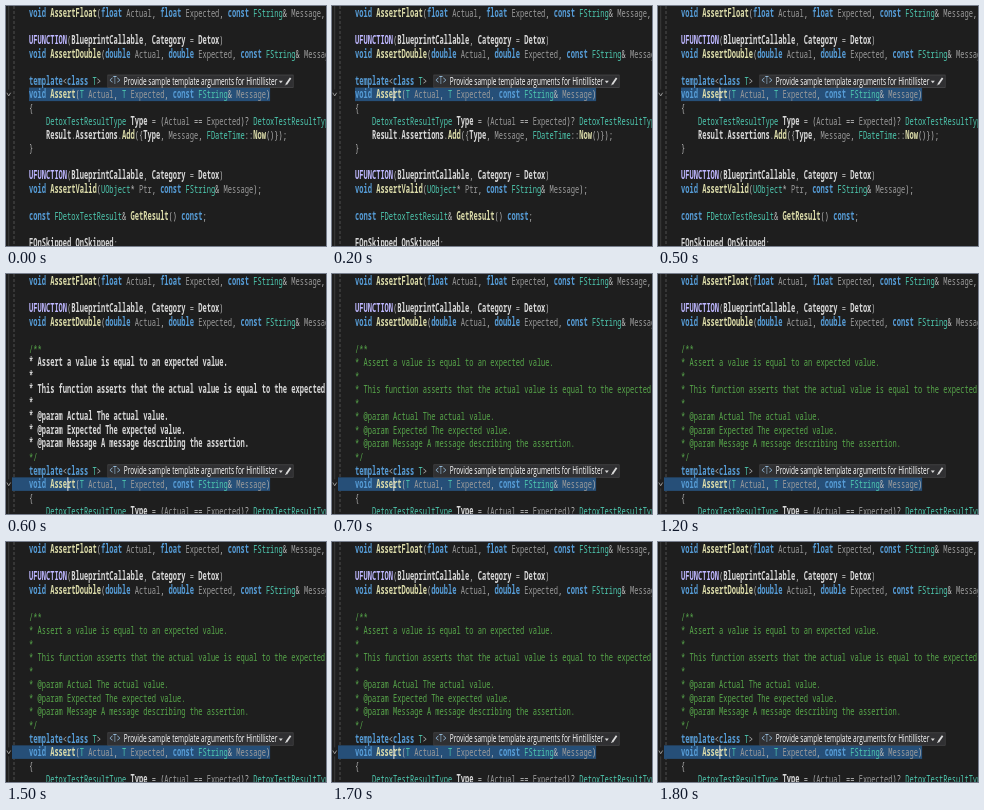
These frames come from a looping animation (320x240 px, 2.1 s). An HTML page with a canvas:

```html
<!DOCTYPE html>
<html lang="en">
<head>
<meta charset="utf-8">
<style>
  html, body { margin: 0; width: 100%; height: 100%; overflow: hidden; background: #1e1e1e; }
  canvas { display: block; }
</style>
</head>
<body>
<canvas id="stage" width="320" height="240"></canvas>
<script>
const ctx = document.getElementById('stage').getContext('2d');

const LOOP = 2100, INSERT_AT = 600, COMMENT_COLORED_AT = 700;
const LEFT = 23, PITCH = 13.53, CELL = 4.23;
// The editor view is squeezed horizontally as a whole.
const SCALE_X = CELL / 12, SCALE_Y = 0.575;
const CODE_FONT = '500 20px "Noto Sans Mono", monospace';
const STRONG_FONT = '600 20px "Noto Sans Mono", monospace';
const LABEL_FONT = '18.5px "Open Sans", sans-serif';
const COLORS = {
  keyword: '#569cd6', type: '#4ec9b0', param: '#9a9a9a', macro: '#beb7ff',
  method: '#dcdcaa', word: '#d8d8d8', sign: '#b8b8b8', comment: '#57a64a'
};

const head = `void AssertFloat(float Actual, float Expected, const FString& Message,

UFUNCTION(BlueprintCallable, Category = Detox)
void AssertDouble(double Actual, double Expected, const FString& Message,
`.split('\n');

const comment = `/**
* Assert a value is equal to an expected value.
*
* This function asserts that the actual value is equal to the expected value.
*
* @param Actual The actual value.
* @param Expected The expected value.
* @param Message A message describing the assertion.
*/`.split('\n');

const tail = `template<class T>
void Assert(T Actual, T Expected, const FString& Message)
{
    DetoxTestResultType Type = (Actual == Expected)? DetoxTestResultType::Pass
    Result.Assertions.Add({Type, Message, FDateTime::Now()});
}

UFUNCTION(BlueprintCallable, Category = Detox)
void AssertValid(UObject* Ptr, const FString& Message);

const FDetoxTestResult& GetResult() const;

FOnSkipped OnSkipped;`.split('\n');

const rowTop = row => 0.4 + row * PITCH;

function text(string, x, baseline, color, font) {
  ctx.save();
  ctx.translate(x, baseline);
  ctx.scale(SCALE_X, SCALE_Y);
  ctx.font = font;
  ctx.fillStyle = color;
  ctx.fillText(string, 0, 0);
  ctx.restore();
}

function rect(x, y, w, h, color) {
  ctx.fillStyle = color;
  ctx.fillRect(x, y, w, h);
}

function path(points, color, width = 1) {
  ctx.beginPath();
  points.forEach(([x, y]) => ctx.lineTo(x, y));
  ctx.strokeStyle = color;
  ctx.lineWidth = width;
  ctx.stroke();
}

function tokenKind(token) {
  if (/^(void|float|double|const|template|class)$/.test(token)) return 'keyword';
  if (/^(T|FString|UObject|FDateTime|FDetoxTestResult|DetoxTestResultType)$/.test(token)) return 'type';
  if (/^(Actual|Expected|Message|Ptr)$/.test(token)) return 'param';
  if (token === 'UFUNCTION') return 'macro';
  if (/^(Assert(Float|Double|Valid)?|GetResult|Add|Now)$/.test(token)) return 'method';
  return /\w/.test(token) ? 'word' : 'sign';
}

function codeLine(line, row, commentColored) {
  const isComment = /^(\/\*|\*)/.test(line);
  const commentKind = commentColored || line.includes('/') ? 'comment' : 'word';
  const tokens = line.matchAll(isComment ? /\S+/g : /\w+|[^\w\s]+/g);
  for (const { 0: token, index } of tokens) {
    const kind = isComment ? commentKind : tokenKind(token);
    const strong = /macro|method|word/.test(kind);
    text(token, LEFT + index * CELL, rowTop(row) + 10.7, COLORS[kind], strong ? STRONG_FONT : CODE_FONT);
  }
}

function tooltip(row) {
  const y = rowTop(row) + 0.6;
  rect(101.5, y, 186, 13.2, '#4a4a4c');
  rect(102.1, y + 0.7, 184.8, 11.8, '#303032');
  text('<T>', 103.2, y + 9.8, '#9cc4e4', '18px "Noto Sans Mono", monospace');
  text('Provide sample template arguments for Hintillister', 117.8, y + 9.9, '#ffffff', LABEL_FONT);
  ctx.fillStyle = '#d8d8d8';
  ctx.beginPath();
  ctx.moveTo(272.8, y + 6);
  ctx.lineTo(276.8, y + 6);
  ctx.lineTo(274.8, y + 8.6);
  ctx.fill();
  path([[280.3, y + 9.6], [284.6, y + 3.4]], '#dcdcdc', 1.8);
  path([[279.4, y + 10.6], [280.5, y + 9.2]], '#dcdcdc', 0.9);
}

function gutter(chevronTop) {
  path([[2.7, 0], [2.7, chevronTop + 2]], '#444444', 0.8);
  path([[2.7, chevronTop + 11], [2.7, 240]], '#444444', 0.8);
  path([[0.8, chevronTop + 5.2], [2.7, chevronTop + 8.4], [4.6, chevronTop + 5.2]], '#a0a0a0', 0.9);
  ctx.setLineDash([3, 2]);
  path([[8, 0], [8, 240]], '#555555', 0.9);
  ctx.setLineDash([]);
}

function draw(time) {
  const inserted = time >= INSERT_AT;
  const caretOn = (time >= 200 && time < 1200) || time >= 1700;
  const lines = [...head, ...(inserted ? comment : []), ...tail];
  const templateRow = lines.indexOf(tail[0]);
  const selectedTop = rowTop(templateRow + 1);
  const selectionLeft = inserted ? 6 : LEFT;
  const selectionRight = LEFT + tail[1].length * CELL;

  rect(0, 0, 320, 240, '#1e1e1e');
  gutter(selectedTop);
  rect(selectionLeft, selectedTop, selectionRight - selectionLeft, PITCH, '#264f78');
  lines.slice(0, 18).forEach((line, row) => codeLine(line, row, time >= COMMENT_COLORED_AT));
  tooltip(templateRow);
  if (caretOn) rect(LEFT + 9 * CELL + 0.3, selectedTop, 1, PITCH, '#e0e0e0');
}

function tick() {
  draw(performance.now() % LOOP);
  requestAnimationFrame(tick);
}
tick();
</script>
</body>
</html>
```
